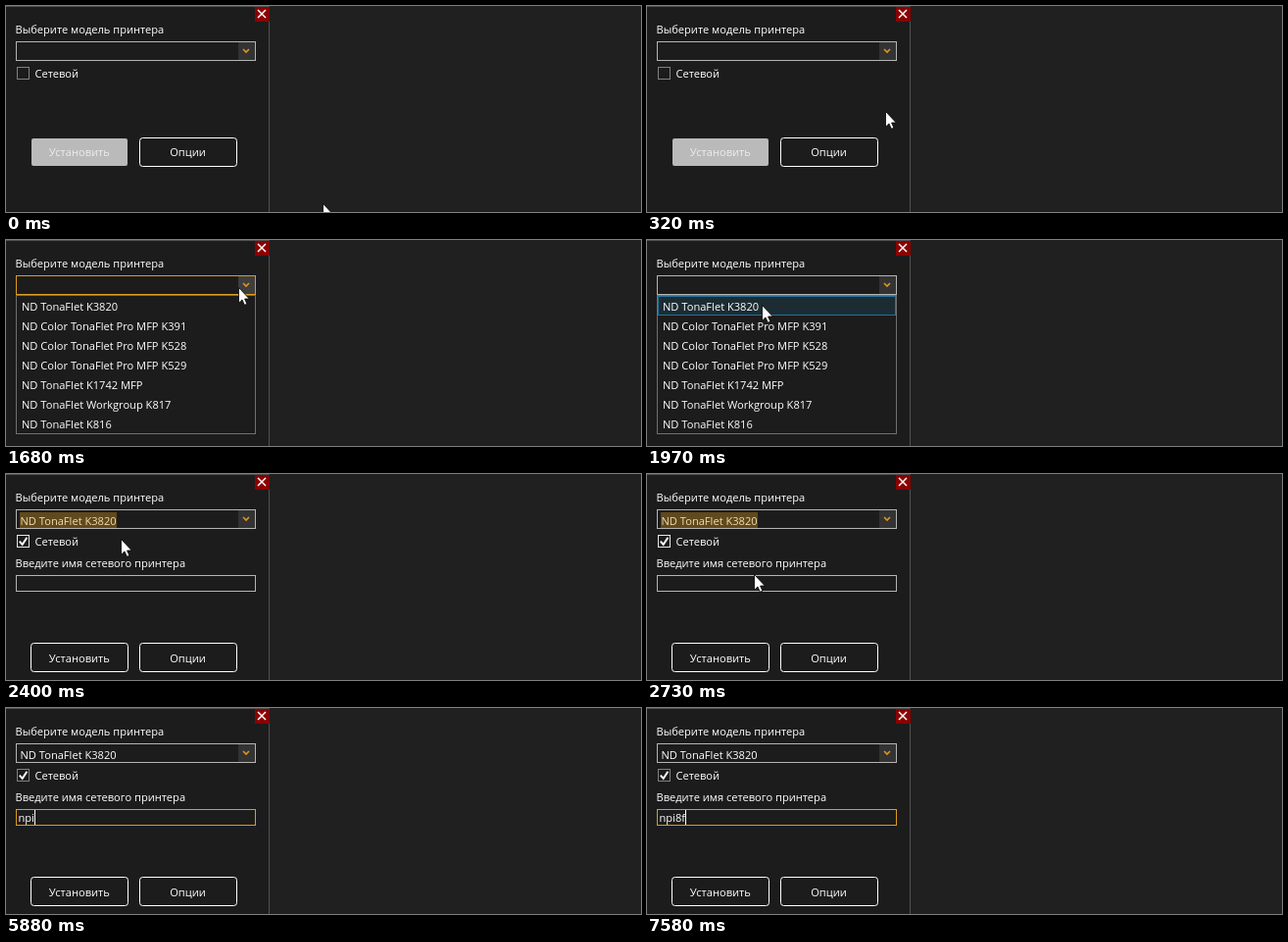
An HTML page that plays this animation: 648x210 px, repeating every 8 s.

```html
<!DOCTYPE html>
<html lang="ru">
<head>
<meta charset="utf-8">
<title>Установка принтера</title>
<style>
html, body { margin: 0; width: 100%; height: 100%; overflow: hidden; background: #202020; }
svg { display: block; width: 648px; height: 210px; font: 500 11.1px "Open Sans", "Noto Sans", sans-serif; }
text { fill: #fff; }
.mid { text-anchor: middle; }
.box { fill: none; stroke: #b4b4b4; }
.gold { stroke: #dc9c1e; }
.btn { fill: none; stroke: #fff; }
</style>
</head>
<body>
<svg viewBox="0 0 648 210">
  <rect width="268" height="210" fill="#1c1c1c"/>
  <path d="M0 .5H268.5V210" fill="none" stroke="#505050"/>
  <rect x="254" y="1" width="15" height="15" fill="#8b0000"/>
  <path d="M257 4L265 12M265 4L257 12" stroke="#fff" stroke-width="1.5"/>
  <text x="9.5" y="28">Выберите модель принтера</text>

  <rect id="combo" class="box" x="10.5" y="36.5" width="244" height="19"/>
  <rect id="drop" x="237" y="37" width="17" height="18" fill="#333"/>
  <path d="M242 44L245 47L248 44" fill="none" stroke="#e0961c" stroke-width="1.6"/>
  <text id="model" x="14.5" y="52"></text>
  <rect id="mark" x="14" y="39" width="102" height="16" fill="#d99a1c" opacity=".36"/>

  <rect id="check" x="11.5" y="62.5" width="12" height="12" fill="none"/>
  <path id="tick" d="M13.8 68.6L16.7 71.8L21.4 64.8" fill="none" stroke="#fff" stroke-width="2"/>
  <text x="29.5" y="73">Сетевой</text>

  <g id="idle">
    <rect x="26" y="135" width="98" height="28" rx="2" fill="#bababa"/>
    <text class="mid" x="74.7" y="153" style="fill:#ececec">Установить</text>
    <rect class="btn" x="136.5" y="134.5" width="99" height="29" rx="3"/>
    <text class="mid" x="185.5" y="153">Опции</text>
  </g>
  <g id="ready">
    <text x="9.5" y="95">Введите имя сетевого принтера</text>
    <rect id="input" class="box" x="10.5" y="103.5" width="244" height="16"/>
    <text id="typed" x="12.5" y="116"></text>
    <rect id="caret" y="104" width="1" height="15" fill="#fff"/>
    <rect class="btn" x="25.5" y="172.5" width="99" height="29" rx="3"/>
    <text class="mid" x="74.7" y="192">Установить</text>
    <rect class="btn" x="136.5" y="172.5" width="99" height="29" rx="3"/>
    <text class="mid" x="185.5" y="192">Опции</text>
  </g>

  <g id="popup">
    <rect x="10.5" y="56.5" width="244" height="141" fill="#1c1c1c" stroke="#707070"/>
    <rect id="hot" x="11.5" y="57.5" width="242" height="19" fill="#1d2c33" stroke="#237399"/>
  </g>

  <path id="arrow" d="M.5 .5V16.2L4 12.9L6.4 18.3L8.9 17.2L6.6 12H11.3Z" fill="#fff" stroke="#000" stroke-width=".8"/>
  <path id="beam" d="M-3 -7.5H-.8L0 -6.8L.8 -7.5H3M0 -6.8V6.8M-3 7.5H-.8L0 6.8L.8 7.5H3" fill="none" stroke="#e8e8e8"/>
</svg>
<script>
const LOOP = 8000;
const models = [
  "ND TonaFlet K3820", "ND Color TonaFlet Pro MFP K391", "ND Color TonaFlet Pro MFP K528",
  "ND Color TonaFlet Pro MFP K529", "ND TonaFlet K1742 MFP", "ND TonaFlet Workgroup K817", "ND TonaFlet K816"
];

// Pointer moves: first step, last step, step count, end point
const moves = [
  [30, 370, 13, 238, 101],
  [590, 780, 8, 247, 47],
  [1650, 1970, 12, 117, 66],
  [2430, 2730, 6, 109, 102],
  [2760, 2990, 4, 110.5, 106],
  [3500, 3560, 3, 108.5, 108]
];
const keys = [[5330, "n"], [5390, "np"], [5880, "npi"], [6750, "npi8"], [7550, "npi8f"]];
const blinks = [[3290, 1], [3870, 0], [4400, 1], [4900, 0], [5330, 1], [6410, 0], [6750, 1], [7370, 0], [7550, 1]];

const el = {};
document.querySelectorAll("[id]").forEach(e => el[e.id] = e);
const show = (e, on) => { e.style.display = on ? "" : "none"; };
const last = (table, t, start) => table.reduce((v, [at, next]) => t >= at ? next : v, start);

models.forEach((name, i) => {
  const item = document.createElementNS("http://www.w3.org/2000/svg", "text");
  item.setAttribute("x", 16);
  item.setAttribute("y", 72 + 20 * i);
  item.textContent = name;
  el.popup.append(item);
});

function pointer(t) {
  let x = 323, y = 201;
  for (const [from, to, n, endX, endY] of moves) {
    if (t < from) break;
    const step = Math.floor((t - from) / (to - from) * (n - 1) + 1e-6) + 1;
    const p = Math.min(1, step / n);
    const ease = p * p * (3 - 2 * p);
    x += (endX - x) * ease;
    y += (endY - y) * ease;
  }
  return [x, y];
}

function draw(t) {
  const [x, y] = pointer(t);
  const open = t >= 1340 && t < 2400;
  const chosen = t >= 2400;
  const marked = chosen && t < 3170;
  const editing = t >= 2760;
  const overCombo = !chosen && x < 255 && y > 36 && y < 56;

  el.combo.classList.toggle("gold", overCombo);
  el.drop.setAttribute("fill", overCombo ? "#3e3e3e" : "#333");
  el.model.textContent = chosen ? models[0] : "";
  show(el.mark, marked);
  if (marked) el.mark.setAttribute("width", Math.round(el.model.getComputedTextLength()) + 1);
  el.check.setAttribute("stroke", marked ? "#e8e8e8" : "#808080");
  show(el.tick, chosen);
  show(el.idle, !chosen);
  show(el.ready, chosen);
  show(el.popup, open);
  show(el.hot, y > 57);

  el.input.classList.toggle("gold", editing);
  el.typed.textContent = last(keys, t, "");
  show(el.caret, last(blinks, t, 0));
  el.caret.setAttribute("x", Math.round(12.5 + el.typed.getComputedTextLength()));

  show(el.arrow, !editing);
  show(el.beam, editing && t < 5330);
  el.arrow.setAttribute("transform", `translate(${Math.round(x)} ${Math.round(y)})`);
  el.beam.setAttribute("transform", `translate(${Math.floor(x) + .5} ${Math.round(y)})`);
}

const begin = performance.now();
function tick(now) {
  draw(Math.max(0, now - begin) % LOOP);
  requestAnimationFrame(tick);
}
draw(0);
requestAnimationFrame(tick);
</script>
</body>
</html>
```
